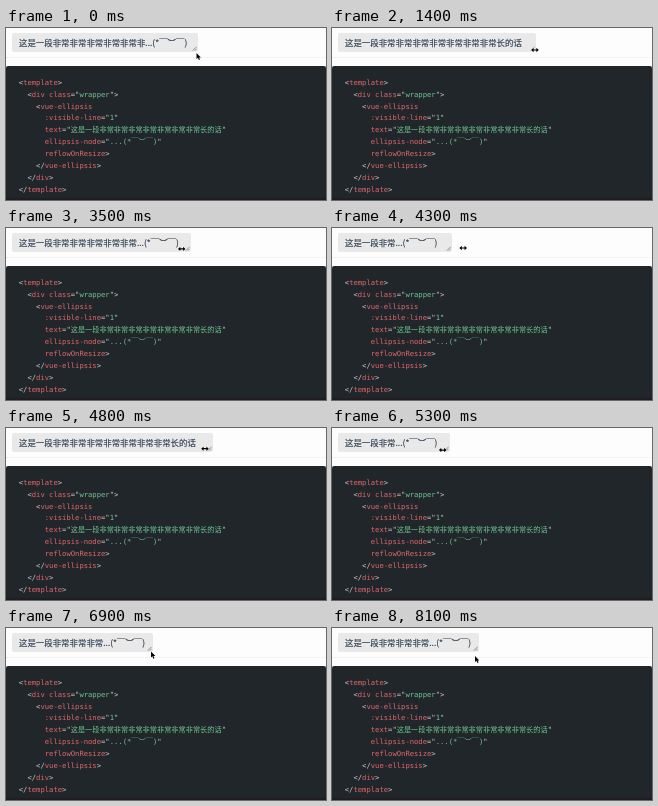
Recreate the animation shown at these times as an HTML page. Size 320x172 px, loop 8400 ms.

```html
<!DOCTYPE html>
<html lang="zh-CN">
<head>
<meta charset="utf-8">
<title>vue-ellipsis</title>
<style>
  html, body { margin: 0; width: 100%; height: 100%; overflow: hidden; background: #fff; }
  #stage { position: relative; width: 320px; height: 172px; overflow: hidden; background: #fdfdfd; }
  #stage > * { position: absolute; }
  #rule { left: 0; top: 29px; width: 320px; border-top: 1px dotted #e9e9eb; }
  #box {
    left: 6px; top: 5px; height: 19px; box-sizing: border-box; padding-left: 7px;
    border-radius: 2px; background: #e9e9ea; color: #2c3e50; overflow: hidden;
    font: 8.43px/19px "Noto Sans CJK SC", "Noto Sans CJK", sans-serif; white-space: pre;
    -webkit-text-stroke: .15px;
  }
  #grip { position: absolute; right: 1px; bottom: 1px; width: 5px; height: 5px; }
  #code {
    left: 0; top: 37.5px; width: 320px; height: 134.5px; box-sizing: border-box;
    padding: 11.3px 0 0 12.8px; border-radius: 2px 2px 0 0; background: #21262b; color: #ccc;
    font: 7.2px/11.9px "DejaVu Sans Mono", "Noto Sans CJK SC", "Noto Sans CJK", monospace;
  }
  #code div { height: 11.9px; white-space: pre; }
  #code b { font-weight: 400; color: #e0686c; }
  #code i { font-style: normal; color: #70c692; }
  #foot { left: 0; top: 170px; width: 320px; height: 2px; background: #1f1c24; }
  #cursors { left: 0; top: 0; }
</style>
</head>
<body>
<div id="stage">
  <div id="rule"></div>
  <div id="box"><span id="text"></span><svg id="grip" viewBox="0 0 5 5"><path d="M.8 4.6L4.6 .8M2.8 4.6L4.6 2.8" stroke="#555" stroke-width=".6"/></svg></div>
  <div id="code">
    <div>&lt;<b>template</b>&gt;</div>
    <div>  &lt;<b>div</b> <b>class</b>="<i>wrapper</i>"&gt;</div>
    <div>    &lt;<b>vue-ellipsis</b></div>
    <div>      <b>:visible-line</b>="<i>1</i>"</div>
    <div>      <b>text</b>="<i>这是一段非常非常非常非常非常非常非常长的话</i>"</div>
    <div>      <b>ellipsis-node</b>="<i>...(*￣︶￣)</i>"</div>
    <div>      <b>reflowOnResize</b>&gt;</div>
    <div>    &lt;/<b>vue-ellipsis</b>&gt;</div>
    <div>  &lt;/<b>div</b>&gt;</div>
    <div>&lt;/<b>template</b>&gt;</div>
  </div>
  <div id="foot"></div>
  <svg id="cursors" width="320" height="172" fill="#000" stroke="#fff" stroke-width=".9" paint-order="stroke">
    <path id="arrow" d="M0 0V6L1.4 4.8 2.4 7.1 3.5 6.6 2.5 4.4H4.4Z"/>
    <path id="resize" d="M-3.8 0L-1.4 -2.2V-.6H1.4V-2.2L3.8 0 1.4 2.2V.6H-1.4V2.2Z"/>
  </svg>
</div>
<script>
  const LOOP = 8400, STEP = 100;
  const FULL = '这是一段' + '非常'.repeat(7) + '长的话', TAIL = '...(*￣︶￣)';
  const CHAR = 8.43, TAIL_WIDTH = 42, PAD = 20;
  const GRAB = -2, LEAD = 50; // the cursor holds the box inside its edge and runs ahead of it

  // Turning points as [time, value], eased in between
  const EDGE = [
    [700, 192], [1850, 210], [2540, 138.5], [3100, 199], [3300, 199],
    [4145, 98], [4700, 212], [5440, 108.5], [6250, 147]
  ];
  const HEIGHT = [
    [0, 25], [200, 23.5], [300, 23.5], [600, 21], [1400, 22], [2600, 22],
    [4300, 20], [5900, 23], [6800, 22], [7100, 28]
  ];
  const DRIFT = [[0, .5], [600, 0], [7500, 0], [8100, -2]];

  function ease(points, t) {
    const i = points.findIndex(p => p[0] > t);
    if (i === 0) return points[0][1];
    if (i < 0) return points[points.length - 1][1];
    const [t0, a] = points[i - 1], [t1, b] = points[i];
    const u = (t - t0) / (t1 - t0);
    return a + (b - a) * u * u * (3 - 2 * u);
  }

  function ellipsize(room) {
    if (room >= FULL.length * CHAR) return FULL;
    return FULL.slice(0, Math.floor((room - TAIL_WIDTH) / CHAR)) + TAIL;
  }

  const $ = id => document.getElementById(id);
  const box = $('box'), text = $('text'), arrow = $('arrow'), resize = $('resize');

  function draw(t) {
    const right = ease(EDGE, t);
    box.style.width = right - 6 + 'px';
    text.textContent = ellipsize(right - PAD);

    const dragging = t >= 600 && t < 6900;
    arrow.style.display = dragging ? 'none' : '';
    resize.style.display = dragging ? '' : 'none';
    const x = ease(EDGE, t + LEAD) + GRAB + ease(DRIFT, t), y = ease(HEIGHT, t);
    (dragging ? resize : arrow).setAttribute('transform', `translate(${x} ${y})`);
  }

  const start = performance.now();
  function tick() {
    const t = (performance.now() - start) % LOOP;
    draw(Math.floor(t / STEP) * STEP);
    requestAnimationFrame(tick);
  }
  tick();
</script>
</body>
</html>
```
